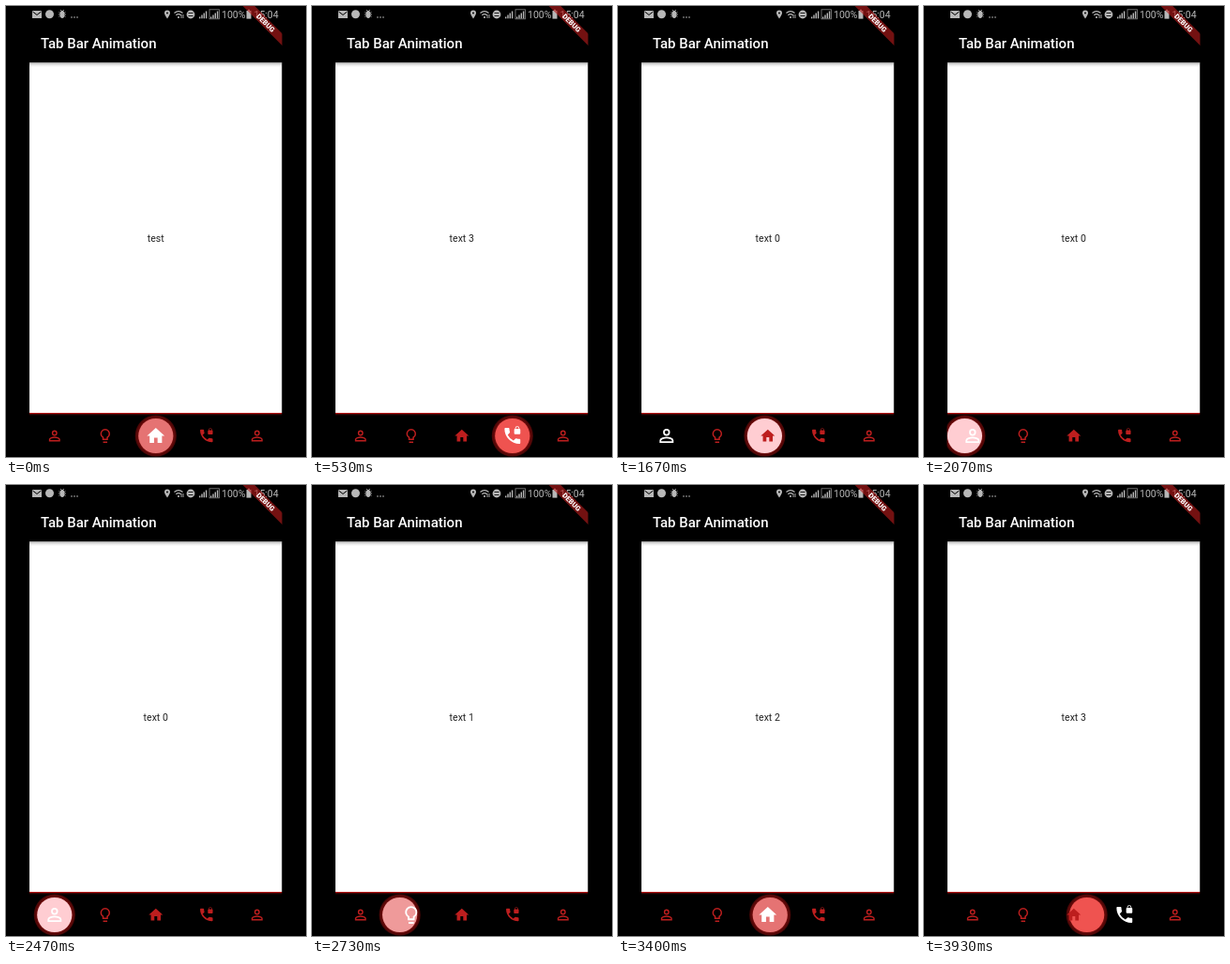
An HTML page with a canvas that plays this animation: 320 by 480 pixels, repeating every 3990 ms.

```html
<!DOCTYPE html>
<html lang="en">
<head>
<meta charset="utf-8">
<title>Tab Bar Animation</title>
<style>
  html, body { margin: 0; width: 100%; height: 100%; overflow: hidden; background: #000; }
  canvas { display: block; width: 320px; height: 480px; }
</style>
</head>
<body>
<canvas id="stage"></canvas>
<script>
const W = 320, H = 480, LOOP = 3990, STEP = 200 / 3;
const LEFT = 25, RIGHT = 294.5, BAR_TOP = 433, BALL_Y = 457.5;
const FONT = 'Roboto, "Noto Sans", sans-serif';
const RED = '#bd1e1e', GREY = '#b8b8b8';
const SHADES = ['#ffcdd2', '#ef9a9a', '#e57373', '#ef5350', '#f44336'];

// tap: label and icon switch; go: ball departs; back: overshoot strength
const HOPS = [
  { to: 3, tap: 66, go: 105, time: 400, back: 1.1 },
  { to: 4, tap: 598, go: 640, time: 400, back: 1.1 },
  { to: 0, tap: 1560, go: 1590, time: 580, back: 1.7 },
  { to: 1, tap: 2595, go: 2624, time: 400, back: 1.1 },
  { to: 2, tap: 3115, go: 3143, time: 400, back: 1.1 },
  { to: 3, tap: 3860, go: 3906, time: 400, back: 1.1 }
];

const person = {
  line: 1.9,
  path: new Path2D('M15 8A3 3 0 1 1 9 8A3 3 0 1 1 15 8ZM5 19V17C5 15.3 9.2 14 12 14S19 15.3 19 17V19Z')
};
const bulb = { line: 2, path: new Path2D('M9 17V14.2A6 6 0 1 1 15 14.2V17ZM9 21H15') };
const home = { path: new Path2D('M10 20V14H14V20H19V12H22L12 3L2 12H5V20Z') };
const phone = {
  path: new Path2D('M4 3H7.5Q8.5 3 8.5 4Q8.5 6 9.1 7.6Q9.2 8.2 8.8 8.6L6.6 10.8' +
    'Q8.9 15.1 13.2 17.4L15.4 15.2Q15.9 14.7 16.5 14.9Q18 15.5 20 15.5Q21 15.5 21 16.5V20Q21 21 20 21' +
    'A17 17 0 0 1 3 4Q3 3 4 3Z' +
    'M15 4V3.5A2.5 2.5 0 0 1 20 3.5V4Q21 4 21 5V9Q21 10 20 10H15Q14 10 14 9V5Q14 4 15 4Z' +
    'M15.8 4H19.2V3.5A1.7 1.7 0 0 0 15.8 3.5Z')
};
const TABS = [person, bulb, home, phone, person];

const canvas = document.getElementById('stage');
const ctx = canvas.getContext('2d');
const dpr = window.devicePixelRatio || 1;
canvas.width = W * dpr;
canvas.height = H * dpr;

const tabX = i => 51.8 + 54 * i;

function outBack(p, s) {
  const v = 1 - Math.min(1, Math.max(0, p));
  return 1 - (s + 1) * v ** 3 + s * v * v;
}

function stateAt(t) {
  const s = { x: tabX(2), active: 2, label: 'test' };
  for (const h of HOPS) {
    if (t >= h.tap) {
      s.active = h.to;
      s.label = 'text ' + h.to;
    }
    if (t >= h.go) s.x += (tabX(h.to) - s.x) * outBack((t - h.go) / h.time, h.back);
  }
  return s;
}

function rect(x, y, w, h, fill) {
  ctx.fillStyle = fill;
  ctx.fillRect(x, y, w, h);
}

function disc(x, y, r, fill) {
  ctx.fillStyle = fill;
  ctx.beginPath();
  ctx.arc(x, y, r, 0, Math.PI * 2);
  ctx.fill();
}

function text(str, x, y, size, fill, weight = 400, align = 'left') {
  ctx.font = `${weight} ${size}px ${FONT}`;
  ctx.textAlign = align;
  ctx.fillStyle = fill;
  ctx.fillText(str, x, y);
}

function shape(d, fill) {
  ctx.fillStyle = fill;
  ctx.fill(new Path2D(d), 'evenodd');
}

function stroke(d, color, width) {
  ctx.strokeStyle = color;
  ctx.lineWidth = width;
  ctx.stroke(new Path2D(d));
}

function icon(kind, x, y, size, color) {
  ctx.save();
  ctx.translate(x - size / 2, y - size / 2);
  ctx.scale(size / 24, size / 24);
  if (kind.line) {
    ctx.strokeStyle = color;
    ctx.lineWidth = kind.line;
    ctx.stroke(kind.path);
  } else {
    ctx.fillStyle = color;
    ctx.fill(kind.path, 'evenodd');
  }
  ctx.restore();
}

function statusBar() {
  // envelope, chat dot, bug, overflow
  rect(28, 5, 10, 8, GREY);
  stroke('M28.5 6L33 9.5L37.5 6', '#000', 1);
  disc(46.5, 8.8, 4.5, GREY);
  stroke('M56.5 6.5L63.5 11.5M63.5 6.5L56.5 11.5M56 9H64M58 4L60 6L62 4', GREY, 0.8);
  ctx.fillStyle = GREY;
  ctx.beginPath();
  ctx.ellipse(60, 9, 2.4, 4, 0, 0, Math.PI * 2);
  ctx.fill();
  for (let i = 0; i < 3; i++) disc(70 + i * 3, 12, 0.8, GREY);

  // location pin
  shape('M172 13.5C170 10.5 169 9 169 7.6A3 3 0 0 1 175 7.6C175 9 174 10.5 172 13.5ZM173 7.6A1 1 0 0 0 171 7.6A1 1 0 0 0 173 7.6Z', GREY);
  // wifi
  stroke('M179.5 7.5Q184 3.8 188.5 7.5M181.3 9.7Q184 7.4 186.7 9.7', GREY, 1.2);
  disc(184, 12, 1.1, GREY);
  stroke('M187 9V13M189 9V13', GREY, 0.9);
  // network badge
  disc(197, 9, 4.4, GREY);
  stroke('M194.5 7.5H199.5M194.5 10.5H199.5', '#222', 1);
  // signal bars
  for (const x of [206, 218]) {
    for (let i = 0; i < 4; i++) rect(x + i * 2.3, 11.5 - i * 2, 1.4, 1.8 + i * 2, GREY);
  }
  ctx.strokeStyle = '#888';
  ctx.lineWidth = 0.8;
  ctx.strokeRect(217, 3.8, 10.4, 10);
  text('100%', 230, 13, 10.5, GREY);
  // battery
  rect(256.5, 5, 5, 8.6, GREY);
  rect(258, 3.8, 2, 1.2, GREY);
  text('15:04', 264.5, 13, 10.5, GREY);
}

function ribbon() {
  ctx.save();
  ctx.translate(295, 0);
  ctx.rotate(Math.PI / 4);
  rect(-30, 21, 60, 9, 'rgba(183,28,28,0.63)');
  text('DEBUG', 0, 28.2, 7.5, '#fff', 900, 'center');
  ctx.restore();
}

function page(label) {
  rect(LEFT, 60, RIGHT - LEFT, BAR_TOP - 60, '#fff');
  const g = ctx.createLinearGradient(0, 60, 0, 65);
  g.addColorStop(0, 'rgba(0,0,0,0.36)');
  g.addColorStop(0.5, 'rgba(0,0,0,0.1)');
  g.addColorStop(1, 'rgba(0,0,0,0)');
  rect(LEFT, 60, RIGHT - LEFT, 5, g);
  text(label, 159.7, 250.5, 10.5, '#222', 400, 'center');
}

function tabBar(s) {
  rect(LEFT, BAR_TOP, RIGHT - LEFT, H - BAR_TOP, '#000');
  rect(LEFT, BAR_TOP, RIGHT - LEFT, 1.4, '#b31515');
  rect(LEFT, BAR_TOP + 1.4, RIGHT - LEFT, 1, '#300404');
  const g = ctx.createRadialGradient(s.x, BALL_Y, 18.5, s.x, BALL_Y, 22.3);
  g.addColorStop(0, '#720b0b');
  g.addColorStop(1, '#3e0505');
  disc(s.x, BALL_Y, 22.1, g);
  disc(s.x, BALL_Y, 18.6, SHADES[s.active]);
  TABS.forEach((kind, i) => {
    const on = i === s.active;
    icon(kind, tabX(i), BALL_Y, on ? 22.5 : 18, on ? '#fff' : RED);
  });
}

function draw(t) {
  const s = stateAt(t);
  ctx.setTransform(dpr, 0, 0, dpr, 0, 0);
  rect(0, 0, W, H, '#000');
  ctx.save();
  ctx.beginPath();
  ctx.rect(LEFT - 0.5, 0, RIGHT - LEFT + 0.5, H);
  ctx.clip();
  statusBar();
  text('Tab Bar Animation', 37, 45, 15, '#fff', 500);
  page(s.label);
  tabBar(s);
  ribbon();
  ctx.restore();
}

const start = performance.now();
function tick() {
  const t = (performance.now() - start) % LOOP;
  // the screen refreshes fifteen times a second
  draw(Math.floor((t + 4) / STEP) * STEP);
  requestAnimationFrame(tick);
}
tick();
</script>
</body>
</html>
```
